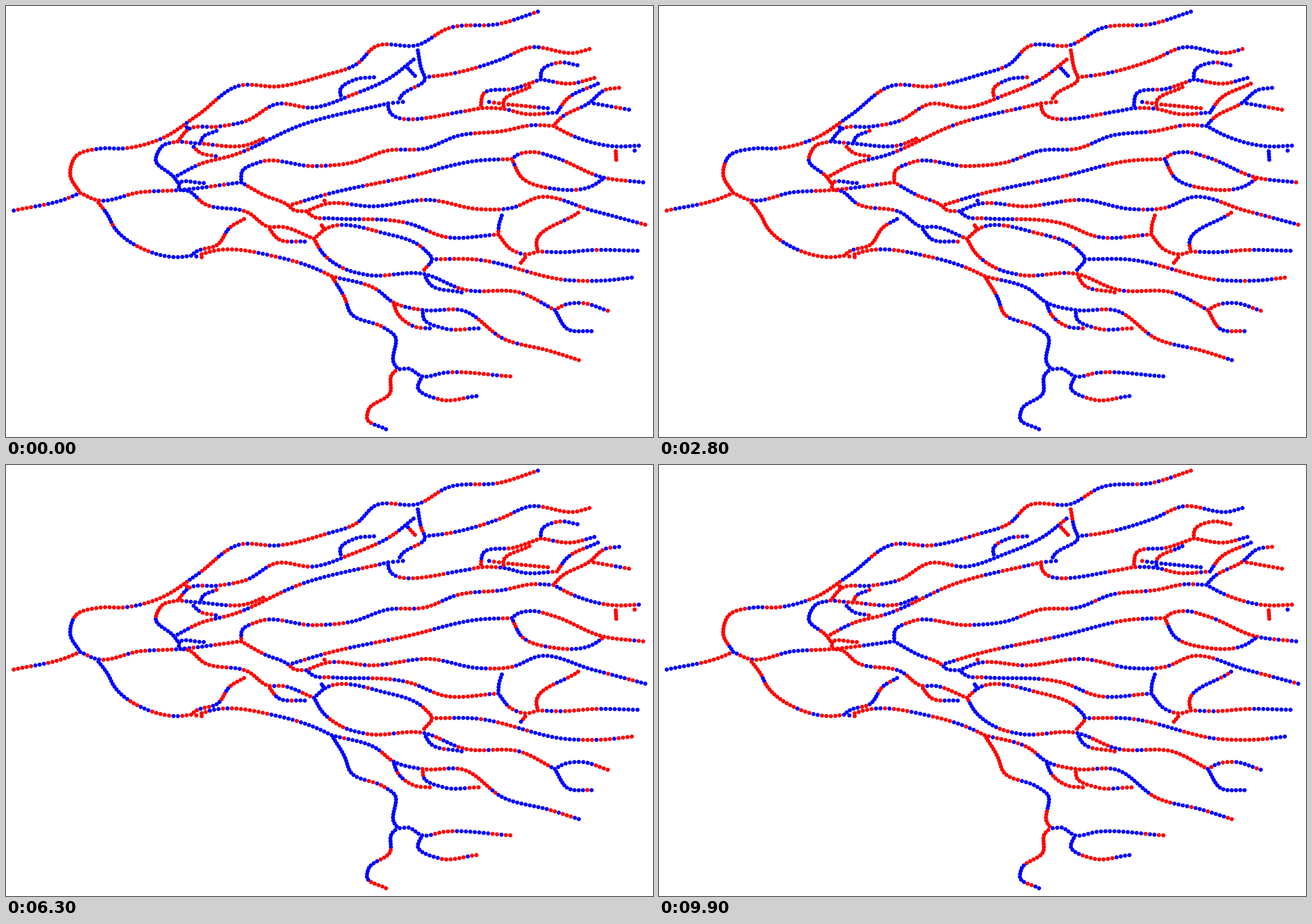
These frames come from a looping animation (916x611 px, 10000 ms). A matplotlib script:

```python
import numpy as np
import matplotlib.pyplot as plt
from matplotlib.animation import FuncAnimation

W, H, DPI = 916, 611, 100
FRAMES, INTERVAL = 100, 100
STEP = np.array([6.3, 4.3])  # dot spacing along x and y
DOT = 5.8                    # dot diameter in pixels

dots, parents, links = [], [], []


def smooth(knots, per=40):
    """Cubic Hermite curve through the knots, parametrised by chord length."""
    gaps = np.hypot(*np.diff(knots, axis=0).T)
    t = np.r_[0, np.cumsum(gaps)]
    slope = np.gradient(knots, t, axis=0)
    u = np.linspace(0, 1, per, endpoint=False)[:, None]
    parts = []
    for a, b, m, n, h in zip(knots, knots[1:], slope, slope[1:], gaps):
        parts.append((2*u**3 - 3*u**2 + 1) * a + (u**3 - 2*u**2 + u) * h * m
                     + (3*u**2 - 2*u**3) * b + (u**3 - u**2) * h * n)
    return np.vstack(parts + [knots[-1:]])


def branch(*knots):
    """Lay evenly spaced dots on a curve and hang it on the nearest dot."""
    curve = smooth(np.array(knots, float))
    length = np.r_[0, np.cumsum(np.hypot(*(np.diff(curve, axis=0) / STEP).T))]
    s = np.linspace(0, length[-1], max(1, round(length[-1])) + 1)
    chain = np.c_[np.interp(s, length, curve[:, 0]),
                  np.interp(s, length, curve[:, 1])]
    parent = -1
    if dots:
        gap = np.hypot(*(np.array(dots) - chain[0]).T)
        parent = int(gap.argmin())
        if gap[parent] < 3.5:
            chain = chain[1:]
    for p in chain:
        links.append(np.hypot(*(p - dots[parent])) if dots else STEP[0])
        dots.append(p)
        parents.append(parent)
        parent = len(dots) - 1


# junctions shared by several branches
root, fork, hub, palm = (105, 265), (128, 275), (245, 261), (333, 250)
left, knee, bud = (243, 192), (238, 243), (541, 138)
top, mid, cluster = (593, 101), (672, 145), (705, 146)
tip, east, core = (775, 170), (716, 217), (425, 291)
bend, south, ring = (697, 324), (753, 348), (436, 330)
gate, low, fin = (603, 359), (592, 381), (777, 431)
wrist, heel, loop = (262, 354), (461, 383), (548, 420)
end, tail, foot = (590, 431), (555, 514), (589, 525)

# stem and upper edge
branch((11, 290), (86, 273), root)
branch(root, (91, 240), (98, 214), (135, 202), (166, 202), (220, 188),
       (271, 155), (330, 113), (385, 114), (452, 98), (497, 82), (522, 58),
       (584, 55), (625, 32), (700, 25), (753, 8))
branch(root, fork, (190, 264), hub, palm)

# upper left cluster
branch(hub, (245, 253), (280, 251))
branch((245, 253), knee, (212, 218), (222, 198), left)
branch(left, (258, 175), (300, 171), (340, 163), (383, 139), (435, 144),
       (490, 126), (545, 101), (577, 76))
branch((258, 175), (256, 172))
branch((566, 85), (579, 99))
branch((475, 131), (473, 120), (495, 104), (521, 101))
branch(left, (275, 195), (345, 196), (364, 188))
branch((275, 195), (278, 187), (298, 177))
branch((262, 196), (275, 208), (297, 213))

# upper right
branch(knee, (275, 224), (320, 212), (420, 168), bud)
branch(bud, (562, 136))
branch((555, 135), (560, 127), top, (589, 92), (583, 63))
branch(top, (625, 97), (700, 76), (740, 59), (808, 66), (826, 61))
branch(bud, (541, 141), (650, 149), mid, cluster, (735, 153), (780, 151))
branch((780, 151), (793, 133), (838, 110))
branch(mid, (675, 126), (720, 117), (757, 104))
branch((757, 104), (758, 93), (785, 80), (809, 84))
branch((757, 104), (800, 110), (833, 102))
branch(cluster, (704, 138), (741, 115))
branch((705, 139), (684, 136))
branch((705, 139), (767, 145))

# middle
branch(palm, (334, 235), (357, 222), (437, 227), (490, 222), (540, 205),
       (593, 202), (640, 184), (705, 177), (745, 169), tip)
branch(tip, (800, 183), (862, 199), (896, 198))
branch((863, 202), (864, 218))
branch((890, 200), (890, 205))
branch(tip, (784, 160), (826, 137), (848, 119), (868, 116))
branch((826, 137), (882, 147))
branch(palm, (365, 268), (400, 283), (407, 289), core)
branch((400, 283), (450, 268), (570, 242), (670, 219), east)
branch(east, (724, 211), (745, 207), (775, 214), (845, 243), (902, 250))
branch(east, (730, 243), (775, 259), (832, 254), (844, 246))
branch(core, (451, 281), (520, 284), (600, 275), (670, 288), (717, 286),
       (755, 271), (830, 290), (905, 310))
branch((451, 281), (451, 276))
branch(core, (436, 299), (460, 301), (573, 309), (620, 327), bend)
branch(bend, (698, 310), (702, 297))
branch(bend, (715, 345), (738, 352), south)
branch((738, 353), (729, 364))
branch(south, (751, 338), (810, 293))
branch(south, (790, 349), (830, 346), (894, 347))

# lower middle
branch(hub, (257, 262), (280, 280), (343, 293), (372, 313), (390, 313), ring)
branch((371, 313), (385, 330), (423, 334))
branch(ring, (451, 317), (535, 322), (592, 345), gate, (592, 374))
branch((451, 317), (447, 311))
branch(gate, (660, 359), (800, 389), (850, 389), (886, 385))
branch(ring, (448, 350), (478, 372), (510, 381), (592, 380), (648, 402),
       (730, 407), fin)
branch(fin, (790, 424), (815, 421), (852, 432))
branch(fin, (795, 458), (829, 461))
branch(low, (600, 394), (645, 406))

# bottom
branch(fork, (145, 298), (152, 312), (200, 347), (245, 356), wrist)
branch(wrist, (268, 349), (300, 338), (317, 314), (337, 302))
branch(wrist, (277, 356))
branch((277, 352), (290, 348), (385, 356), (440, 373), heel)
branch(heel, (525, 402), loop, end, (648, 432), (705, 472), (770, 489),
       (811, 502))
branch(loop, (555, 437), (580, 455), (600, 457))
branch(end, (591, 442), (620, 457), (669, 457))
branch(heel, (480, 415), (487, 434), (535, 456), (550, 467), (550, 508),
       tail, (570, 514), foot, (620, 520), (714, 525))
branch(foot, (583, 540), (615, 558), (666, 553))
branch(tail, (546, 523), (544, 548), (513, 573), (511, 584), (538, 600))

# Two-state spins: each dot copies its parent unless its link flips.
rng = np.random.default_rng(7)
count = len(dots)
weak = 0.6 * rng.random(count) ** 2
chance = weak * np.clip((np.array(links) - 3) / 3, 0.25, 1.1)
flips = np.where(rng.random((FRAMES, count)) < chance, -1, 1)
spins = np.empty((FRAMES, count), int)
for i, parent in enumerate(parents):
    if parent < 0:
        spins[:, i] = rng.choice([-1, 1], FRAMES)
    else:
        spins[:, i] = spins[:, parent] * flips[:, i]


def colours(frame):
    return np.where(spins[frame] > 0, "#ff0000", "#0000ff")


fig = plt.figure(figsize=(W / DPI, H / DPI), dpi=DPI, facecolor="white")
ax = fig.add_axes([0, 0, 1, 1])
ax.set(xlim=(0, W), ylim=(H, 0))
ax.axis("off")
net = ax.scatter(*np.array(dots).T, s=(DOT * 72 / DPI) ** 2, c=colours(0),
                 linewidths=0)


def update(frame):
    net.set_facecolor(colours(frame))
    return net,


anim = FuncAnimation(fig, update, frames=FRAMES, interval=INTERVAL,
                     repeat=True, repeat_delay=0, blit=False)
plt.show()
```
